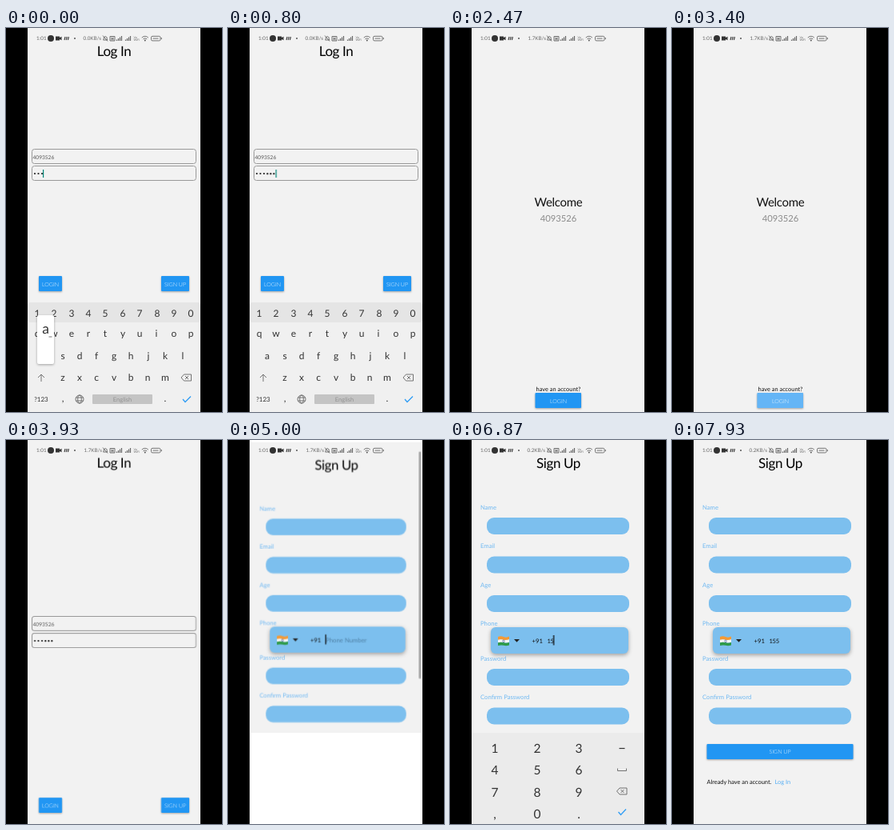
These frames come from a looping animation (270x480 px, 8 s). An HTML page:

```html
<!DOCTYPE html>
<html lang="en">
<head>
<meta charset="utf-8">
<title>Log in and sign up</title>
<style>
html, body { margin: 0; width: 100%; height: 100%; overflow: hidden; background: #000; }
svg { display: block; width: 100%; height: 100%; }
text { font-family: Lato, "Open Sans", sans-serif; fill: #111; white-space: pre; text-rendering: geometricPrecision; }
.mid { text-anchor: middle; }
.title { font-size: 17px; letter-spacing: -.4px; fill: #000; }
.label { font-size: 7.7px; fill: #70b9f2; }
.small { font-size: 7.4px; }
.cap { font-size: 7px; font-weight: 300; fill: #eef7ff; text-anchor: middle; }
.page { fill: #f2f2f2; }
.btn { fill: #2196f3; filter: drop-shadow(0 1px 1px #0005); }
.press { fill: #fff; fill-opacity: .3; }
.box { fill: none; stroke: #999; }
.bar { fill: #7cbfee; }
.keys text { font-size: 12px; fill: #333; text-anchor: middle; }
.pad text { font-size: 15.5px; }
.pop rect { fill: #fff; filter: drop-shadow(0 1px 1.5px #0005); }
.keys .pop text { font-size: 17.5px; }
.line { fill: none; stroke: #666; stroke-width: .9; }
.status text { font-size: 6.3px; fill: #666; }

/* smooth motion */
.move, .t { animation: 8s linear infinite; transform-origin: 135px 240px; }
#login { animation-name: login; }
#welcome { animation-name: welcome; }
#signup { animation-name: signup; transform-origin: 135px 183px; }
#qwerty { animation-name: qwerty; }
#pad { animation-name: pad; }
#scroll { animation-name: scroll; }

@keyframes login {
  0%, 15.875% { opacity: 1; transform: none; }
  17.5% { opacity: 0; transform: scale(1.08); }
  44.5% { opacity: 0; transform: scale(1.1); }
  47% { opacity: 1; transform: scale(1.015); }
  49.125%, 59% { opacity: 1; transform: none; }
  61.5%, 100% { opacity: 0; transform: scale(1.08); }
}
@keyframes welcome {
  0%, 15.875% { opacity: 0; transform: scale(.85); }
  18% { opacity: 1; transform: scale(.979); }
  18.375% { opacity: 1; transform: scale(.985); }
  20.5%, 44% { opacity: 1; transform: none; }
  47%, 100% { opacity: 0; transform: scale(.88); }
}
@keyframes signup {
  0%, 59% { opacity: 0; transform: scale(.85); }
  61.5% { opacity: 1; transform: scale(.97); }
  62.5% { opacity: 1; transform: scale(.985); }
  64.5%, 100% { opacity: 1; transform: none; }
}
@keyframes qwerty {
  0%, 16.625% { opacity: 1; transform: none; }
  18.375% { opacity: .85; transform: translateY(54px); }
  20.875%, 100% { opacity: .6; transform: translateY(140px); }
}
@keyframes pad {
  0%, 63.3% { transform: translateY(116px); animation-timing-function: ease-out; }
  66.625%, 98.37% { transform: none; }
  98.375%, 100% { transform: translateY(116px); }
}
@keyframes scroll {
  0%, 59% { opacity: 0; }
  61.5%, 64% { opacity: 1; }
  66.5%, 100% { opacity: 0; }
}

/* hard switches */
.t { animation-timing-function: step-end; }
#fields { animation-name: fields; }
#buttons { animation-name: buttons; }
@keyframes fields { 0% { transform: none; } 30%, 100% { transform: translateY(69px); } }
@keyframes buttons { 0% { transform: none; } 30%, 100% { transform: translateY(137px); } }

#popA { animation-name: popA; }
#popO { animation-name: popO; }
#popN { animation-name: popN; }
@keyframes popA { 0% { opacity: 1; } .875%, 100% { opacity: 0; } }
@keyframes popO { 0% { opacity: 0; } .875% { opacity: 1; } 2.5%, 100% { opacity: 0; } }
@keyframes popN { 0% { opacity: 0; } 5% { opacity: 1; } 6.625%, 100% { opacity: 0; } }

#dot4 { animation-name: dot4; }
#dot5 { animation-name: dot5; }
#dot6 { animation-name: dot6; }
#caret { animation-name: caret; }
@keyframes dot4 { 0% { opacity: 0; } .875%, 100% { opacity: 1; } }
@keyframes dot5 { 0% { opacity: 0; } 2.5%, 100% { opacity: 1; } }
@keyframes dot6 { 0% { opacity: 0; } 5.875%, 100% { opacity: 1; } }
@keyframes caret {
  0% { opacity: 1; transform: none; }
  .875% { opacity: 1; transform: translateX(4.5px); }
  2.5% { opacity: 1; transform: translateX(9px); }
  5.875% { opacity: 1; transform: translateX(13.5px); }
  16%, 100% { opacity: 0; transform: none; }
}

#tapLogin { animation-name: tapLogin; }
#tapBack { animation-name: tapBack; }
#tapSign { animation-name: tapSign; }
@keyframes tapLogin { 0% { opacity: 0; } 9.125% { opacity: 1; } 10%, 100% { opacity: 0; } }
@keyframes tapBack { 0% { opacity: 0; } 41.625% { opacity: 1; } 44%, 100% { opacity: 0; } }
@keyframes tapSign { 0% { opacity: 0; } 58.375% { opacity: 1; } 60%, 100% { opacity: 0; } }

#rate0 { animation-name: rate0; }
#rate1 { animation-name: rate1; }
#rate2 { animation-name: rate2; }
@keyframes rate0 { 0% { opacity: 1; } 26.625%, 100% { opacity: 0; } }
@keyframes rate1 { 0% { opacity: 0; } 26.625% { opacity: 1; } 77.5%, 100% { opacity: 0; } }
@keyframes rate2 { 0% { opacity: 0; } 77.5%, 100% { opacity: 1; } }

#hint { animation-name: hint; }
#num1 { animation-name: num1; }
#num2 { animation-name: num2; }
#num3 { animation-name: num3; }
#cursor { animation-name: cursor; }
@keyframes hint { 0% { opacity: 1; } 81.625%, 100% { opacity: 0; } }
@keyframes num1 { 0% { opacity: 0; } 81.625%, 100% { opacity: 1; } }
@keyframes num2 { 0% { opacity: 0; } 85.875%, 100% { opacity: 1; } }
@keyframes num3 { 0% { opacity: 0; } 88.375%, 100% { opacity: 1; } }
@keyframes cursor {
  0% { opacity: 1; transform: none; }
  72.5% { opacity: 0; transform: none; }
  77.5% { opacity: 1; transform: none; }
  81.625% { opacity: 1; transform: translateX(3.7px); }
  85.875% { opacity: 1; transform: translateX(7.7px); }
  88.375% { opacity: 1; transform: translateX(12px); }
  95%, 100% { opacity: 0; transform: translateX(12px); }
}

#key1 { animation-name: key1; }
#key5 { animation-name: key5; }
#keyOk { animation-name: keyOk; }
#gap { animation-name: gap; }
#footer { animation-name: footer; }
@keyframes key1 { 0% { opacity: 0; } 80.875% { opacity: 1; } 83.3%, 100% { opacity: 0; } }
@keyframes key5 { 0% { opacity: 0; } 87.5% { opacity: 1; } 88.375%, 100% { opacity: 0; } }
@keyframes keyOk { 0% { opacity: 0; } 95% { opacity: 1; } 95.875%, 100% { opacity: 0; } }
@keyframes gap { 0% { opacity: 0; } 61.5% { opacity: 1; } 70%, 100% { opacity: 0; } }
@keyframes footer { 0% { opacity: 0; } 99.125%, 100% { opacity: 1; } }
</style>
</head>
<body>
<svg viewBox="0 0 270 480">
  <rect x="27" width="216" height="480" fill="#fff"/>

  <g id="login" class="move">
    <rect class="page" x="27" width="216" height="480"/>
    <text class="title mid" x="135" y="34.5">Log In</text>
    <g id="fields" class="t">
      <rect class="box" x="32.5" y="151.5" width="205" height="18" rx="3"/>
      <rect class="box" x="32.5" y="172.5" width="205" height="18" rx="3"/>
      <text x="33.5" y="163.5" font-size="6.6" style="fill:#555">4093526</text>
      <g fill="#222">
        <circle cx="36" cy="182" r="1.1"/><circle cx="40.5" cy="182" r="1.1"/><circle cx="45" cy="182" r="1.1"/>
        <circle id="dot4" class="t" cx="49.3" cy="182" r="1.1"/>
        <circle id="dot5" class="t" cx="53.3" cy="182" r="1.1"/>
        <circle id="dot6" class="t" cx="57.3" cy="182" r="1.1"/>
      </g>
      <rect id="caret" class="t" x="46" y="177" width="1.2" height="10" fill="#008577"/>
    </g>
    <g id="buttons" class="t">
      <rect class="btn" x="41" y="310" width="29" height="19" rx="1"/>
      <rect class="btn" x="194" y="310" width="35" height="19" rx="1"/>
      <text class="cap" x="55.5" y="322.5">LOGIN</text>
      <text class="cap" x="211.5" y="322.5">SIGN UP</text>
      <rect id="tapLogin" class="t press" x="41" y="310" width="29" height="19" rx="1"/>
      <rect id="tapSign" class="t press" x="194" y="310" width="35" height="19" rx="1"/>
    </g>
  </g>

  <g id="welcome" class="move">
    <rect class="page" x="27" width="216" height="480"/>
    <text class="mid" x="135.5" y="223" font-size="15" letter-spacing="-.3">Welcome</text>
    <text class="mid" x="135.5" y="241.5" font-size="11.2" style="fill:#8a8a8a">4093526</text>
    <text class="small mid" x="135.5" y="453.5">have an account?</text>
    <rect class="btn" x="106.5" y="456" width="57.5" height="19" rx="1"/>
    <text class="cap" x="135.5" y="468.5">LOGIN</text>
    <rect id="tapBack" class="t press" x="106.5" y="456" width="57.5" height="19" rx="1"/>
  </g>

  <g id="signup" class="move">
    <rect class="page" x="27" width="216" height="480"/>
    <text class="title mid" x="135.5" y="34.5">Sign Up</text>
    <g class="bar">
      <rect x="46" y="97" width="178" height="21" rx="9"/>
      <rect x="46" y="145.5" width="178" height="21" rx="9"/>
      <rect x="46" y="194" width="178" height="21" rx="9"/>
      <rect x="46" y="286" width="178" height="21" rx="9"/>
      <rect x="46" y="334.5" width="178" height="21" rx="9"/>
    </g>
    <text class="label" x="38" y="86.5">Name</text>
    <text class="label" x="38" y="135">Email</text>
    <text class="label" x="38" y="183.5">Age</text>
    <text class="label" x="38" y="232">Phone</text>
    <text class="label" x="38" y="275.5">Password</text>
    <text class="label" x="38" y="324">Confirm Password</text>
    <rect class="bar" x="51" y="234" width="172" height="33" rx="6" style="filter:drop-shadow(0 2px 2.5px #0005)"/>
    <g>
      <path d="M60 246q3.5-1.5 7 0t7-.5v4q-3.5 1.2-7 .4t-7 .2z" fill="#f59a35"/>
      <path d="M60 249.7q3.5-1 7 0t7-.4v3.4q-3.5 1.2-7 .4t-7 .2z" fill="#f7f7f7"/>
      <path d="M60 253.3q3.5-1 7 0t7-.4v3.6q-3.5 1.2-7 .3t-7 .3z" fill="#2e9a48"/>
      <circle cx="67" cy="251.4" r="1.3" fill="none" stroke="#35509a" stroke-width=".6"/>
    </g>
    <path d="M80 249h7l-3.5 3.7z" fill="#222"/>
    <text x="102.5" y="254" font-size="7.7">+91</text>
    <text id="hint" class="t" x="122" y="253.5" font-size="7.8" style="fill:#4f80a5">Phone Number</text>
    <g font-size="7.5">
      <text id="num1" class="t" x="121.5" y="254">1</text>
      <text id="num2" class="t" x="125.5" y="254">5</text>
      <text id="num3" class="t" x="129.7" y="254">5</text>
    </g>
    <rect id="cursor" class="t" x="121.3" y="244" width="1.3" height="12.5" fill="#111"/>
    <g id="footer" class="t">
      <rect class="btn" x="43.5" y="380" width="183" height="19" rx="1"/>
      <text class="cap" x="135" y="392">SIGN UP</text>
      <text class="small" x="43.5" y="430">Already have an account.</text>
      <text class="small" x="128.5" y="430" style="fill:#55aef5">Log In</text>
    </g>
    <rect id="scroll" class="move" x="240" y="12" width="3" height="288" rx="1" fill="#a9a9a9"/>
  </g>
  <rect id="gap" class="t" x="27" y="366" width="216" height="114" fill="#fff"/>

  <g id="qwerty" class="move keys">
    <rect x="27" y="343" width="216" height="137" fill="#f0f0f0"/>
    <rect x="27" y="343" width="216" height="25" rx="4" fill="#e5e5e5"/>
    <text x="39 60 82 103 124 146 167 189 210 231" y="360.5">1234567890</text>
    <text x="39 60 82 103 124 146 167 188 210 231" y="385.5">qwertyuiop</text>
    <text x="49 71 92 113 135 156 178 199 221" y="413.5">asdfghjkl</text>
    <text x="71 92 113 135 156 177 199" y="440.5">zxcvbnm</text>
    <text x="44" y="467" style="font-size:8px">?123</text>
    <text x="71 199" y="467">,.</text>
    <rect x="108" y="458" width="75" height="12" rx="1" fill="#c4c4c4"/>
    <text x="145.5" y="467" style="font-size:7.5px;fill:#929292">English</text>
    <g class="line">
      <path d="M44 442v-9m-4 4 4-4 4 4"/>
      <path d="M219 437l3.5-4h9v8h-9zm5-2 4 4m0-4-4 4"/>
      <circle cx="92" cy="464" r="5"/>
      <ellipse cx="92" cy="464" rx="2.3" ry="5"/>
      <path d="M87.5 462h9m-9 4h9"/>
      <path d="M221 464l3 3.5 7-7" stroke="#2f9df5" stroke-width="1.3"/>
    </g>
    <g id="popA" class="t pop"><rect x="39" y="359" width="21" height="61" rx="2"/><text x="49.5" y="381.5">a</text><path class="line" d="M53.5 386h4"/></g>
    <g id="popO" class="t pop"><rect x="199.5" y="331" width="21" height="61" rx="2"/><text x="210" y="353.5">o</text></g>
    <g id="popN" class="t pop"><rect x="167" y="387" width="21" height="61" rx="2"/><text x="177.5" y="409.5">n</text></g>
  </g>

  <g id="pad" class="move keys pad">
    <rect x="27" y="366" width="216" height="114" fill="#ebebeb"/>
    <g fill="#d2d2d2">
      <rect id="key1" class="t" x="29" y="372" width="52" height="26" rx="3"/>
      <rect id="key5" class="t" x="83" y="399" width="51" height="26" rx="3"/>
      <rect id="keyOk" class="t" x="190" y="453" width="37" height="20" rx="3"/>
    </g>
    <text x="56 109 161" y="391">123</text>
    <text x="56 109 161" y="418">456</text>
    <text x="56 109 161" y="445.5">789</text>
    <text x="56 109 161" y="473">,0.</text>
    <g class="line">
      <path d="M211.500 385.500h7" stroke="#333" stroke-width="1.2"/>
      <path d="M209.5 410.5v3h11v-3"/>
      <path d="M208.5 439l3.5-4h9v8h-9zm5-2 4 4m0-4-4 4"/>
      <path d="M210.5 465l3 3.5 6.5-7" stroke="#2f9df5" stroke-width="1.3"/>
    </g>
  </g>

  <g class="status">
    <text x="38" y="15.3">1:01</text>
    <circle cx="56" cy="13" r="4" fill="#333"/>
    <path d="M62 10.5h5v1.5l2.5-1.3v4.6l-2.5-1.3v1.5h-5z" fill="#333"/>
    <path d="M73 15l1-4m1.2 4 1-4m1.2 4 1-4" stroke="#444" stroke-width="1.2"/>
    <circle cx="86" cy="13" r=".9" fill="#444"/>
    <text id="rate0" class="t" x="96.5" y="15.3">0.0KB/s</text>
    <text id="rate1" class="t" x="97.5" y="15.3">1.7KB/s</text>
    <text id="rate2" class="t" x="96.5" y="15.3">0.2KB/s</text>
    <g class="line">
      <path d="M121.5 15h5.5l-.8-1.2v-2q-2-2.6-4 0v2zm-.5-5.5 6 7"/>
      <path d="M130 10.5h6v5.500h-6zm2 1v4m2-4v4m-2-2h2"/>
      <path d="M138.5 16v-1.5m2 1.5v-3m2 3v-4.5m2 4.5v-6M149.5 16v-1.5m2 1.5v-3m2 3v-4.5m2 4.5v-6" stroke-width="1.2"/>
      <path d="M169.8 12q4-3.4 8 0m-6.4 1.8q2.4-2 4.8 0"/>
      <rect x="181.5" y="10.3" width="11.5" height="5.6" rx="1.5"/>
      <path d="M194.3 12v2.2m-10.8-1.1h7"/>
    </g>
    <circle cx="173.8" cy="15.4" r="1" fill="#555"/>
    <text x="159.5" y="12.7" style="font-size:3.6px">Vo</text>
    <text x="159.5" y="16.2" style="font-size:3.6px">WiFi</text>
  </g>

  <path d="M0 0h27v480H0zM243 0h27v480h-27z"/>
</svg>
</body>
</html>
```
